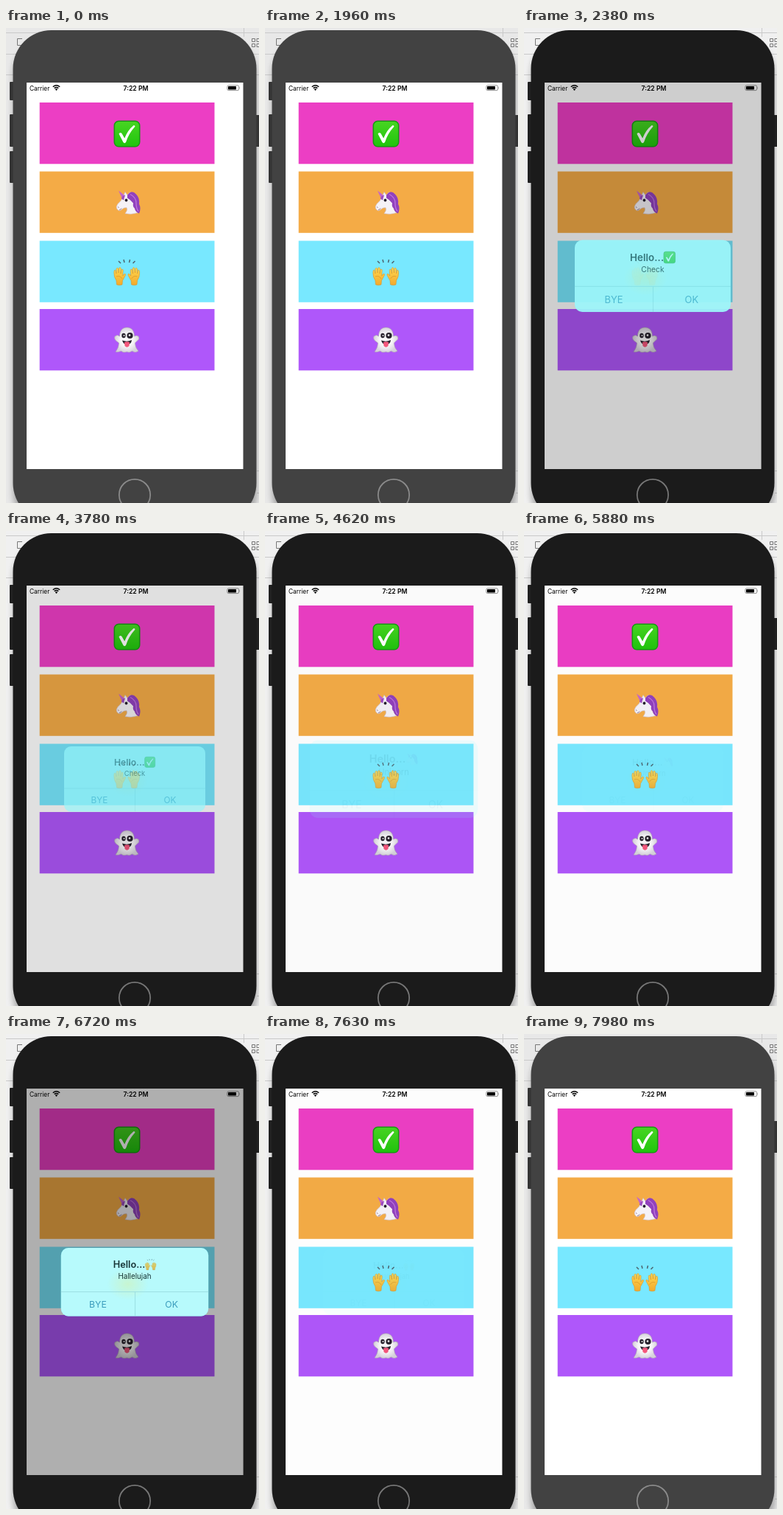
An HTML page that plays this animation: 344x644 px, repeating every 8000 ms.

```html
<!DOCTYPE html>
<html lang="en">
<head>
<meta charset="utf-8">
<title>Alert demo</title>
<style>
  html, body { margin: 0; width: 100%; height: 100%; overflow: hidden; background: #ececec; }
  svg { display: block; width: 344px; height: 644px; }
  text { font-family: Inter, "Liberation Sans", sans-serif; }
</style>
</head>
<body>
<svg viewBox="0 0 344 644" xmlns="http://www.w3.org/2000/svg">
  <defs>
    <linearGradient id="green" x2="0" y2="1">
      <stop stop-color="#48d522"/><stop offset="1" stop-color="#20c40d"/>
    </linearGradient>
    <linearGradient id="skin" x2="0" y2="1">
      <stop stop-color="#ffd84f"/><stop offset="1" stop-color="#f2a92b"/>
    </linearGradient>
    <radialGradient id="ghostWhite">
      <stop offset=".5" stop-color="#f8f7f9"/><stop offset="1" stop-color="#d6d2db"/>
    </radialGradient>
    <radialGradient id="glow">
      <stop stop-color="#eaf5b4" stop-opacity=".75"/><stop offset="1" stop-color="#eaf5b4" stop-opacity="0"/>
    </radialGradient>
    <filter id="soft" x="-20%" y="-20%" width="140%" height="140%"><feGaussianBlur stdDeviation="4"/></filter>

    <g id="check">
      <rect x=".8" y=".8" width="34.4" height="34.4" rx="6" fill="url(#green)" stroke="#169c12" stroke-width="1.5"/>
      <path d="M7 18Q9 15.5 11 17.5L14.7 24Q19 13 27 6.5Q29 6 29 8Q20 18 16.5 29.5Q14.5 31.500 13 29.500Z" fill="#fff"/>
    </g>
    <g id="unicorn">
      <path d="M5 2L14 9L10 13Z" fill="#c565c9"/>
      <path d="M11 11L14 4L17 8L21 4L23 10Q27 14 26 22Q27 29 31 32Q22 35 14 33Q18 28 16 25Q12 25 10 27Q6 31 3 27Q1 24 4 20Q9 16 11 11Z" fill="#f5f2f7" stroke="#cbc2d2" stroke-width=".6"/>
      <path d="M17 8Q23 0 29 7Q34 12 33 20Q36 26 33 33Q28 31 27 26Q24 24 25 19Q21 14 17 12Z" fill="#9141bd"/>
      <path d="M21 7Q29 11 29 19Q29 26 32 30" fill="none" stroke="#bd75dc" stroke-width="1.3"/>
      <path d="M9 13Q10 8 14 8L12 15Z" fill="#9d4dc2"/>
      <circle cx="15.500" cy="15" r="1.9" fill="#272030"/>
      <path d="M4 24l1.500 1M6 28q2 0 3-2" stroke="#8c7995" fill="none"/>
    </g>
    <g id="hand">
      <path d="M4.500 35L3.800 29Q.6 25 .8 18Q1 14.500 2.800 15L4 20L4 13.500Q5.500 10.500 6.700 13.500L7 19L7.700 12.500Q9.300 10.500 10.300 13L10 20L11 14.500Q13 13 13.200 15.500L12.800 23Q14 20.500 15.600 20Q17.600 20.500 15.800 23.500L12.500 29.500L12 35Q8 36.500 4.500 35Z" fill="url(#skin)" stroke="#d68b23" stroke-width=".5"/>
      <path d="M4 24Q9 22 12 27" fill="none" stroke="#d99427" stroke-width=".7"/>
    </g>
    <g id="hands">
      <use href="#hand"/><use href="#hand" transform="matrix(-1 0 0 1 36.500 0)"/>
      <path d="M7 3l3 3M14 1l1 4M22.500 1l-1 4M29.500 3l-3 3" stroke="#4d6470" stroke-width="1.500"/>
    </g>
    <g id="ghost">
      <path d="M18 1C25 1 28 6 28 13Q31 11 34 13.500Q35.500 17 32 19L29 22Q29 28 33.500 33Q29 36 25 33Q21 36 18 34Q13 36 10 33Q6 35 2.500 34Q7 28 7 22L3 19Q0 16 1.500 13Q5 10 8 13C8 6 11 1 18 1Z" fill="url(#ghostWhite)" stroke="#aaa2b0" stroke-width=".6"/>
      <g fill="#27212c"><ellipse cx="13.500" cy="12" rx="2.700" ry="3.200"/><circle cx="22" cy="12" r="4.100"/>
        <path d="M11.500 18.500Q18 21 24.500 18Q24 24 18 24Q13 24 11.500 18.500Z"/></g>
      <circle cx="14" cy="12" r=".9" fill="#fff"/><circle cx="21.500" cy="11.500" r="1.300" fill="#fff"/>
      <path d="M14.500 21Q18 19.500 21.500 21L21 26Q18 29.500 15 26Z" fill="#f4577c"/>
    </g>
  </defs>

  <!-- desktop behind the phone -->
  <path id="desk" d="M0 0H344V644H0Z"/>
  <path d="M0 6.500H344M0 35.500H344M0 63.500H344M323.500 0V12M341 600.500H344M341 630.500H344" stroke="#c9c9c9"/>
  <path d="M22 14.500H15.500V23.500H22M334.500 14.500h4v4h-4zM341 14.500h4v4h-4zM334.500 21.500h4v4h-4zM341 21.500h4v4h-4z" fill="none" stroke="#777"/>
  <rect x="10" y="12" width="331" height="670" rx="52" fill="#000" opacity=".3" filter="url(#soft)"/>

  <g id="sides"><rect x="5" y="73" width="7" height="25" rx="1"/><rect x="5" y="117" width="7" height="44" rx="1"/><rect x="5" y="167" width="7" height="43" rx="1"/><rect x="338" y="118" width="7" height="43" rx="1"/></g>
  <rect id="body" x="9.500" y="3" width="331" height="666" rx="52"/>
  <circle id="home" cx="175" cy="633" r="21.200" fill="none" stroke-width="1.800"/>

  <rect x="28" y="74" width="294.500" height="524" fill="#fff"/>
  <text x="32" y="84.500" font-size="8.400">Carrier</text>
  <g fill="none" stroke="#000" stroke-width="1.500"><path d="M63.800 79.800Q68.500 75.800 73.200 79.800M65.700 81.700Q68.500 79.400 71.300 81.700"/></g>
  <path d="M66.800 83Q68.500 81.700 70.200 83L68.500 85Z"/>
  <text x="176.500" y="84.500" font-size="8.700" font-weight="600" text-anchor="middle">7:22 PM</text>
  <rect x="300.900" y="77.800" width="15.800" height="6.800" rx="1.800" fill="none" stroke="#777" stroke-width=".8"/>
  <rect x="302" y="79" width="11" height="4.500" rx=".8"/><path d="M317.500 80q1.200 1.200 0 2.400z" fill="#777"/>

  <g id="cards"></g>
  <rect id="dim" x="28" y="74" width="294.500" height="524"/>

  <g id="alert">
    <rect id="tint" x="79" y="292" width="192" height="88.500" rx="9.500" fill="#69f0fa"/>
    <g id="content">
      <rect x="79" y="292" width="192" height="88.500" rx="9.500" fill="#cdfdfd"/>
      <ellipse cx="166" cy="339" rx="27" ry="21" fill="url(#glow)"/>
      <path d="M79 349H271M175.500 349V380.500" stroke="#a5d5d9" stroke-width=".8"/>
      <text x="147" y="317.700" font-size="12.200" font-weight="600">Hello...</text>
      <use id="icon" transform="translate(188.300 306) scale(.41)"/>
      <text id="message" x="175" y="331.800" font-size="9.400" text-anchor="middle"></text>
      <g font-size="11.800" fill="#2f86ad" text-anchor="middle"><text x="127" y="369.300">BYE</text><text x="223" y="369.300">OK</text></g>
    </g>
  </g>
</svg>
<script>
const LOOP = 8000, STEP = 70, RATE = 0.018;
const WAKE = 2030, SLEEP = 7840;
const $ = id => document.getElementById(id);
const set = (id, attrs) => Object.entries(attrs).forEach(([k, v]) => $(id).setAttribute(k, v));

const cards = [
  ["check", "#ec3ec4", 101, 146.500, 125.500],
  ["unicorn", "#f4ab46", 194.500, 148, 218.500],
  ["hands", "#78e8ff", 288.500, 146, 313],
  ["ghost", "#af57fa", 381, 146.500, 405],
];
$("cards").innerHTML = cards.map(([icon, color, top, x, y]) =>
  `<rect x="45.700" y="${top}" width="237.800" height="83.300" fill="${color}"/>
   <use href="#${icon}" x="${x}" y="${y}"/>`).join("");

const alerts = [
  { icon: "check", message: "Check", show: 2290, hide: 3645 },
  { icon: "unicorn", message: "Unicorn", show: 4600, hide: 5580 },
  { icon: "hands", message: "Hallelujah", show: 6560, hide: 7300 },
];

// Critically damped spring from 0 to 1.
function spring(ms) {
  const x = Math.max(0, ms) * RATE;
  return 1 - (1 + x) * Math.exp(-x);
}

function render(t) {
  const awake = t >= WAKE && t < SLEEP;
  set("desk", { fill: awake ? "#f0f0f0" : "#e8e8e8" });
  set("body", { fill: awake ? "#1b1b1b" : "#424242" });
  set("sides", { fill: awake ? "#202020" : "#343434" });
  set("home", { stroke: awake ? "#777" : "#8b8b8b" });

  const current = alerts.filter(a => t >= a.show).pop();
  const entered = current ? spring(t - current.show) : 0;
  const shown = current ? entered * (1 - spring(t - current.hide)) : 0;
  set("dim", { opacity: 0.4 * shown });
  set("alert", { visibility: shown > 0.004 ? "visible" : "hidden" });
  if (!current) return;

  const scale = 1.2 - 0.2 * entered;
  set("alert", { transform: `translate(175 336) scale(${scale}) translate(-175 -336)` });
  set("tint", { opacity: Math.min(1, 1.8 * shown) });
  set("content", { opacity: shown });
  set("icon", { href: "#" + current.icon });
  $("message").textContent = current.message;
}

const start = performance.now();
function tick() {
  const t = (performance.now() - start) % LOOP;
  render(Math.floor(t / STEP) * STEP);
  requestAnimationFrame(tick);
}
tick();
</script>
</body>
</html>
```
